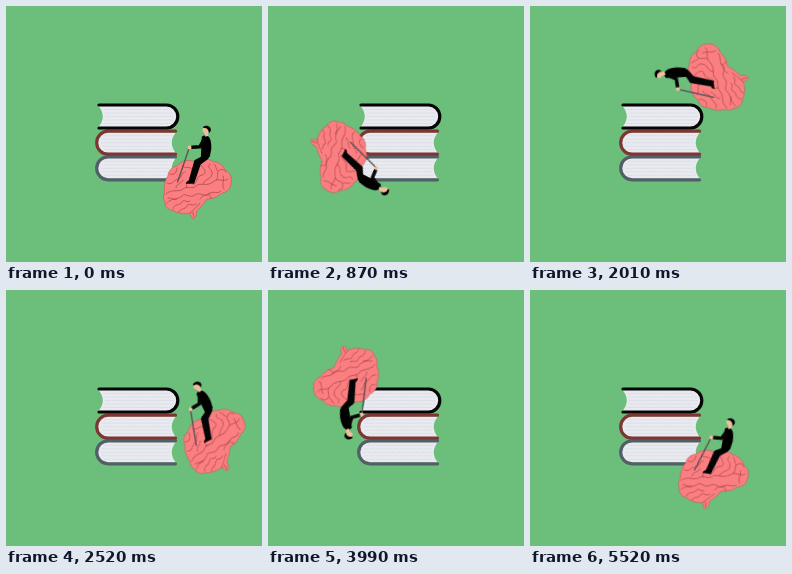
Animation, 256 px wide and 256 px high, one loop 5.55 s. Source, as an HTML page:

```html
<!DOCTYPE html>
<html lang="en">
<head>
<meta charset="utf-8">
<title>Riding a brain around books</title>
<style>
html, body { margin: 0; width: 100%; height: 100%; overflow: hidden; background: #6bbf7b; }
svg { display: block; width: 100vw; height: 100vh; }
.cover { fill: none; stroke: currentColor; stroke-width: 3.2; stroke-linecap: round; }
.pages { fill: #e8eaef; }
.lines { fill: none; stroke: #d2d4de; stroke-width: .7; stroke-dasharray: 1.6 .8; }
.folds { fill: none; stroke: #a8434a; stroke-width: .7; stroke-linecap: round; }
.limb { fill: none; stroke: #050505; stroke-linecap: round; stroke-linejoin: round; }
.skin { fill: #f2bd9b; }

/* 4deg every 30ms, with two short holds */
.orbit { transform-origin: 139.5px 128.3px; animation: orbit 5550ms -2ms infinite; }
@keyframes orbit {
  0% { transform: rotate(0deg); animation-timing-function: steps(50); }
  27.027027% { transform: rotate(200deg); animation-timing-function: steps(1); }
  28.108108% { transform: rotate(204deg); animation-timing-function: steps(100); }
  82.162162% { transform: rotate(604deg); animation-timing-function: steps(1); }
  83.243243% { transform: rotate(608deg); animation-timing-function: steps(31); }
  100% { transform: rotate(732deg); }
}
</style>
</head>
<body>
<svg viewBox="0 0 256 256">
  <defs>
    <g id="book">
      <path class="pages" d="M170-10.500Q161.500 0 170 10.500H102A10.500 10.500 0 0 1 102-10.500Z"/>
      <path class="lines" d="M98-7H166M96-3.500H164M95 0H163.500M96 3.500H164M98 7H166"/>
      <path class="cover" d="M169.500-11.500H102A11.300 11.500 0 0 0 102 11.500H169.500"/>
    </g>
  </defs>

  <use href="#book" color="#535f67" transform="translate(0 162.300)"/>
  <use href="#book" color="#7c3732" transform="translate(0 136.700)"/>
  <use href="#book" color="#050505" transform="translate(262.500 110.500) scale(-1 1)"/>

  <g class="orbit">
    <path fill="#fb7f80" stroke="#c4545a" stroke-width=".6" d="M158.500 187C157.500 180 159 174 162 170C162 165 166 161 171 160C175 155 182 153 188 155.500C194 152 202 152 207 155.500C213 156 218 160 219 164C224 166 226.500 172 225 177C225 183 221 186 216 187C212 191 206 193 201 193C198 198 194 202 190.500 205C191 209 189.500 213 186.500 212.500C184.500 211 185 209 184 207C178 209 171 207 167 204.500C162 204 158.500 200 159 196C157 193 157 190 158.500 187Z"/>
    <path class="folds" d="M160 188C166 182 172 187 177 183S186 184 190 180S201 181 207 176S217 177 222 173
      M161 197C166 191 173 194 176 190S184 193 189 189S198 192 203 188S211 189 215 185
      M161 177C166 180 167 174 172 173S174 167 179 166
      M164 168C168 170 171 166 171 162M176 160C179 163 183 160 186 163S190 169 187 173
      M170 182C170 177 175 179 177 174M181 182C178 176 184 173 189 172
      M187 179C192 176 190 170 196 169S198 162 194 158
      M197 178C199 172 205 174 206 168S200 163 204 158
      M210 174C214 171 209 166 214 164S218 166 220 166
      M208 158C211 160 209 163 212 165M217 170C219 175 215 178 218 183
      M167 203C168 197 174 200 176 196S181 198 184 195M173 206C174 202 179 204 181 200S186 201 190 198
      M184 207C187 204 190 202 194 197M194 193C197 188 200 190 204 187M162 192C166 191 168 195 171 193
      M187 206L187.500 211M203 189C206 190 203 192 206 192"/>

    <g transform="translate(-1.200 -.2)">
      <path d="M184.500 142L172.800 176.200" fill="none" stroke="#575055" stroke-width="1.300" stroke-linecap="round"/>
      <path class="limb" stroke-width="4.600" d="M202 150.500L191.500 156L186.500 174"/>
      <path class="limb" stroke-width="3.500" d="M202 152L194.500 157.500L188.500 175"/>
      <path d="M190 174L189.500 178H181Q181 177 182 176L185 174Z"/>
      <path d="M197 131Q200 128.500 204 131Q206.700 134 206.500 143L205 151Q201 154 196 153L196.500 141Z"/>
      <path class="limb" stroke-width="3.500" d="M199 134L195 141L187.500 141.500"/>
      <circle class="skin" cx="184.800" cy="141.700" r="1.900"/>
      <path class="skin" d="M199.500 126H203.500V130L200.500 131Z"/>
      <path class="skin" d="M198.500 121.500Q201.500 119 204.500 122Q205.500 126 202 128Q199 128.500 198.500 126L197.500 125Z"/>
      <path d="M198 122Q198.500 119.500 202.500 120Q206.500 121 206 125L204.200 127.500L203.500 124.500L201.500 122.500Z"/>
    </g>
  </g>
</svg>
</body>
</html>
```
